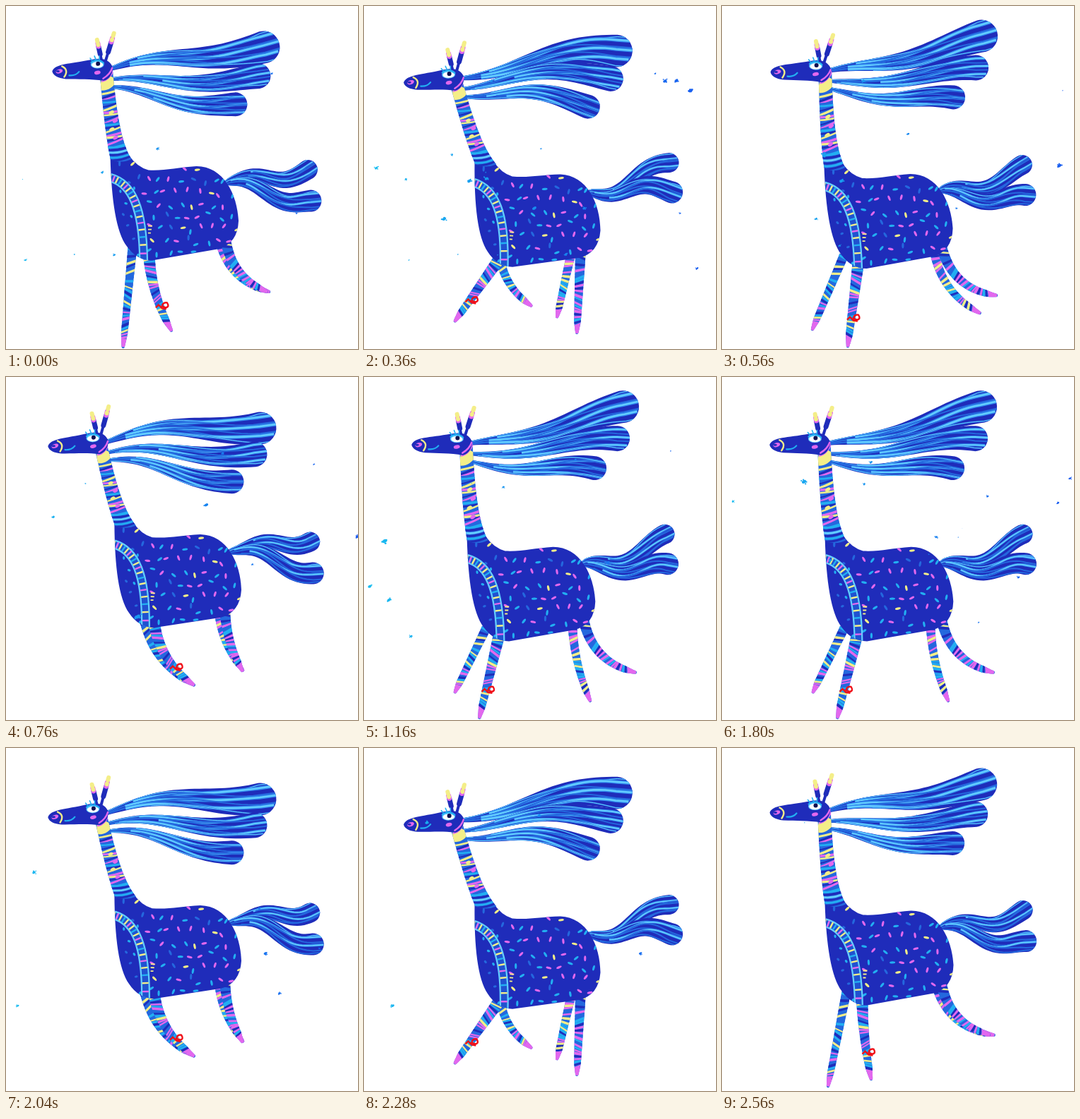
These frames come from a looping animation (498 px wide and 486 px high, 2.6 s). An HTML page with a canvas:

```html
<!DOCTYPE html>
<html lang="en">
<head>
<meta charset="utf-8">
<title>Galloping horse</title>
<style>
html, body { margin: 0; width: 100%; height: 100%; overflow: hidden; background: #fff; }
canvas { display: block; }
</style>
</head>
<body>
<canvas id="stage" width="498" height="486"></canvas>
<script>
const ctx = document.getElementById('stage').getContext('2d');
const LOOP = 2600, STEP = 40, STRIDE = 640;
const NAVY = '#1f2cba', BLUE = '#2468de', CYAN = '#22aff2', SKY = '#64ceff',
      PINK = '#e268ee', YELLOW = '#f4ee88';
const rnd = i => { const v = Math.sin(i * 127.1 + 3.7) * 43758.5453; return v - Math.floor(v); };
const mix = (a, b, s) => a + (b - a) * s;
const wave = (a, phase, mean, c, s) => mean + c * Math.cos(a - phase) + s * Math.sin(a - phase);

// Hoof paths: positions at eight even moments of one stride.
const FORE = [[211, 469], [254, 449], [264, 426], [200, 427], [140, 436], [128, 458], [150, 479], [178, 482]];
const HIND = [[378, 406], [355, 406], [310, 428], [262, 446], [284, 462], [322, 458], [372, 430], [388, 410]];

// Hair: root, resting tip, tip swing, size, ripple phase and mean sag.
const MANE = [
  { root: [150, 94], tip: [365, 61], swing: 19, r: 23, phase: 2, sag: -4 },
  { root: [150, 109], tip: [357, 101], swing: 14, r: 18, phase: 1.3, sag: -4 },
  { root: [150, 120], tip: [325, 141], swing: 12, r: 17, phase: 1.4, sag: -3 }
];
const TAIL = [
  { root: [309, 263], tip: [426, 227], swing: 6.5, r: 14, phase: 3.3, sag: 5 },
  { root: [309, 265], tip: [430, 270], swing: 8, r: 15.5, phase: 2.8, sag: -1 }
];

// Body and head sway as simple harmonics of the stride angle.
const bodyAt = a => ({ x: 240, y: 310, dx: wave(a, 0, 4, -4.5, 3.2), dy: wave(a, 0, -9, -1.5, -10), rot: wave(a, 0, .025, -.025, .012) });
const headAt = a => ({ x: 130, y: 90, dx: wave(a, 0, -5.5, 7, -4.5), dy: wave(a, 0, 2, -7.5, -.5), rot: wave(a, 0, -.025, .025, -.025) });
function place(part, [x, y]) {
  const c = Math.cos(part.rot), s = Math.sin(part.rot), u = x - part.x, v = y - part.y;
  return [part.x + part.dx + u * c - v * s, part.y + part.dy + u * s + v * c];
}
function enter(part) {
  ctx.translate(part.x + part.dx, part.y + part.dy);
  ctx.rotate(part.rot);
  ctx.translate(-part.x, -part.y);
}

// Point on a closed Catmull-Rom curve.
function along(keys, t) {
  const n = keys.length, f = (t / STRIDE % 1 + 1) % 1 * n, i = Math.floor(f), u = f - i;
  const [o, p, q, r] = [n - 1, 0, 1, 2].map(k => keys[(i + k) % n]);
  return [0, 1].map(k => p[k] + u / 2 * (q[k] - o[k] +
    u * (2 * o[k] - 5 * p[k] + 4 * q[k] - r[k] + u * (3 * (p[k] - q[k]) + r[k] - o[k]))));
}

function heading(curve, s) {
  const a = curve(Math.max(0, s - .02)), b = curve(Math.min(1, s + .02));
  return Math.atan2(b[1] - a[1], b[0] - a[0]);
}
function beside(curve, s, off, ahead = 0) {
  const [x, y] = curve(s), a = heading(curve, s), c = Math.cos(a), d = Math.sin(a);
  return [x - d * off + c * ahead, y + c * off + d * ahead];
}
function ribbon(curve, width) {
  const path = new Path2D(), N = 30, a = heading(curve, 1);
  for (let i = 0; i <= N; i++) path.lineTo(...beside(curve, i / N, -width(i / N)));
  path.arc(...curve(1), width(1), a - Math.PI / 2, a + Math.PI / 2);
  for (let i = N; i >= 0; i--) path.lineTo(...beside(curve, i / N, width(i / N)));
  path.closePath();
  return path;
}

function fill(path, color) { ctx.fillStyle = color; ctx.fill(path); }
function stroke(path, color, w) { ctx.strokeStyle = color; ctx.lineWidth = w; ctx.stroke(path); }
function line(d, color, w) { stroke(new Path2D(d), color, w); }
function band(curve, s, half, slant, color, w) {
  const p = new Path2D();
  p.moveTo(...beside(curve, Math.max(0, s - slant), -half));
  p.lineTo(...beside(curve, Math.min(1, s + slant), half));
  stroke(p, color, w);
}
function oval(x, y, rx, ry, color, rot = 0) {
  ctx.beginPath();
  ctx.ellipse(x, y, rx, ry, rot, 0, 7);
  ctx.fillStyle = color;
  ctx.fill();
}
function layer(draw, clip) {
  ctx.save();
  if (clip) ctx.clip(clip);
  draw();
  ctx.restore();
}

// A lock of hair: a ripple runs from the root to a swinging tip.
function hair(lock, a, part, speed, lag, taper, seed) {
  const { r, tip, swing, phase, sag } = lock;
  const [x0, y0] = place(part, lock.root);
  const x1 = tip[0] + part.dx * .8, y1 = tip[1] + swing * Math.cos(a - lag);
  const curve = s => [mix(x0, x1, s),
    mix(y0, y1, s) + Math.sin(Math.PI * s) * (sag + 14 * Math.cos(a + phase - speed * s))];
  const width = s => r * mix(.13, 1, s ** taper);
  const shape = ribbon(curve, width);
  fill(shape, NAVY);
  layer(() => {
    const n = r > 16 ? 9 : 7;
    for (let j = 0; j < n; j++) {
      const k = (j + .5) / n * 1.8 - .9, from = j % 3 ? .35 * rnd(seed + j) : 0, p = new Path2D();
      const at = s => k + .14 * Math.sin(7 * s + seed + j * 2);
      for (let i = 0; i <= 24; i++) {
        const s = mix(from, 1, i / 24);
        p.lineTo(...beside(curve, s, width(s) * at(s)));
      }
      p.lineTo(...beside(curve, 1, r * at(1), r * Math.sqrt(1 - k * k)));
      const main = j % 3 === 1;
      stroke(p, main ? '#3088ee' : BLUE, main ? r / 4.5 : 2);
      if (main || j % 4 === 0) stroke(p, SKY, main ? r / 9 : 1);
    }
  }, shape);
}

const BANDS = [BLUE, YELLOW, NAVY, PINK, CYAN];
function leg(keys, t, body, hip, thick, seed) {
  const [fx, fy] = along(keys, t), [rx, ry] = place(body, hip);
  const hx = rx + .12 * (fx - rx), hy = ry;
  // The knee bows forward as the hoof trails behind the hip.
  const bow = .44 * Math.max(0, fx - hx), len = Math.hypot(fx - hx, fy - hy);
  const cx = (hx + fx) / 2 - bow * (fy - hy) / len, cy = (hy + fy) / 2 + bow * (fx - hx) / len;
  const bend = (h, c, f, s) => mix(mix(h, c, s), mix(c, f, s), s);
  const curve = s => [bend(hx, cx, fx, s), bend(hy, cy, fy, s)];
  const shape = ribbon(curve, s => mix(thick, 4.4, s) * Math.min(1, .5 + (1 - s) * 4));
  fill(shape, BLUE);
  layer(() => {
    for (let i = 0; i < 32; i++) {
      const color = BANDS[(i * 2 + Math.floor(rnd(seed + i) * 3)) % 5];
      band(curve, i / 32, 13, .05 * Math.sin(seed + i / 3), i > 28 ? PINK : color, mix(2, 4, rnd(seed + i * 5)));
    }
    band(curve, .96, 13, 0, PINK, 12);
  }, shape);
  return curve;
}

function ribbonBow([x, y]) {
  line(`M${x - 6} ${y + 2}l4 -4 5 5 6 1M${x + 3} ${y}q1 -6 7 -5 4 6 -2 7z`, '#f01018', 2.4);
}

const TORSO = new Path2D('M146 230C148 290 155 335 170 355Q184 375 206 375L300 358Q327 350 328 318C326 280 306 241 268 241C240 243 224 248 200 247Q184 243 172 226Z');
const SASH = new Path2D('M146 258C176 266 193 298 194 378');
const sash = s => [[146, 176, 193, 194], [258, 266, 298, 378]].map(([a, b, c, d]) =>
  a * (1 - s) ** 3 + 3 * b * s * (1 - s) ** 2 + 3 * c * s * s * (1 - s) + d * s ** 3);

function torso(body) {
  enter(body);
  fill(TORSO, NAVY);
  ctx.clip(TORSO);
  for (let i = 0; i < 96; i++) {
    const col = i % 12, row = Math.floor(i / 12);
    const x = 158 + col * 15.5 + (row % 2) * 7 + rnd(i) * 8, y = 237 + row * 17.5 + rnd(i + 200) * 11;
    const c = rnd(i + 400), chest = x < 186 && y > 264;
    const color = c < .5 ? CYAN : c < .62 ? BLUE : c < .84 ? PINK : YELLOW;
    oval(x, y, chest ? 2.4 : 4, 1.6, chest && c > .5 ? BLUE : color, rnd(i + 600) * 3.14);
  }
  stroke(SASH, SKY, 13);
  stroke(SASH, '#2052d0', 8.5);
  for (let i = 0; i < 19; i++) band(sash, i / 18, 4.5, 0, [YELLOW, PINK, YELLOW, CYAN][i % 4], 2.4);
  for (let i = 0; i < 3; i++) line(`M200 ${326 + i * 5}h${6 - i}`, YELLOW, 1.8);
}

const NECK = new Path2D('M134 108C137 150 139 190 146 232Q160 240 176 232C162 208 156 160 152 94L140 98Z');
function neck(body, head) {
  const base = place(body, [158, 228]), bx = base[0] - 158, by = base[1] - 228;
  const sx = (head.dx - bx) / 118, sy = (head.dy - by) / 118;
  ctx.transform(1, 0, -sx, 1 - sy, bx + sx * 228, by + sy * 228);
  fill(NECK, BLUE);
  ctx.clip(NECK);
  const tones = [YELLOW, NAVY, PINK, BLUE, CYAN, NAVY, YELLOW, BLUE, PINK];
  for (let i = 0; i < 24; i++) {
    const y = 126 + i * 3.9, tilt = 7 + 4 * Math.sin(i * 1.3);
    line(`M130 ${y + tilt}Q152 ${y + 4} 176 ${y - tilt}`, tones[i % 9], mix(2, 3.8, rnd(i + 40)));
  }
  line('M134 118Q144 120 152 106', YELLOW, 16);
  line('M136 112Q146 110 153 95', PINK, 3);
  for (let i = 0; i < 4; i++) oval(149 + (i % 2) * 5, 160 + i * 13, 4, 2.5, i % 2 ? PINK : YELLOW, -.6);
  [CYAN, NAVY, SKY, NAVY, CYAN, NAVY].forEach((c, i) =>
    line(`M140 ${213 + i * 4}Q158 ${217 + i * 4} 178 ${206 + i * 4}`, c, 3));
}

const FACE = new Path2D('M66 97C70 86 90 87 122 81Q146 76 152 93Q150 108 139 111C120 108 104 109 85 108Q68 106 66 97Z');
function ear(x0, y0, x1, y1) {
  const at = s => `${mix(x0, x1, s)} ${mix(y0, y1, s)}`;
  const part = (a, b, color, w) => line(`M${at(a)}L${at(b)}`, color, w);
  part(0, .5, NAVY, 4);
  part(.3, .66, NAVY, 7);
  part(.68, .82, PINK, 7);
  part(.75, .77, YELLOW, 6);
  part(.9, 1, YELLOW, 6);
}
function face(head) {
  enter(head);
  ctx.lineCap = 'round';
  ear(136, 82, 130, 53);
  ear(142, 82, 154, 44);
  fill(FACE, NAVY);
  oval(76, 97, 5, 3, PINK, -.3);
  oval(74, 97, 2.6, 1.5, NAVY);
  line('M80 90Q90 95 83 105', YELLOW, 2.4);
  line('M90 103Q99 104 104 98', CYAN, 2.2);
  oval(130, 99.5, 4.5, 2.6, PINK, -.2);
  oval(130, 88, 9.5, 5.5, SKY);
  oval(130, 88.5, 8, 4.2, '#fff');
  oval(131, 87, 3, 3, '#101050');
  line('M121 85Q130 78 139 86', CYAN, 2);
  line('M123 83L120 79M128 81L126 76M133 81L133 76', CYAN, 1.6);
  line('M138 108Q148 102 151 93', PINK, 2.4);
}

// Paint specks drift downwind; most appear early in the loop.
function specks(t) {
  for (let i = 0; i < 60; i++) {
    const dt = t - 150 - 2250 * rnd(i + 70) ** 1.6, life = 220;
    if (Math.abs(dt) >= life) continue;
    const x = 498 * rnd(i + 140) + dt * .1, y = mix(95, 385, rnd(i + 210));
    const r = mix(1.6, 3.4, rnd(i + 280)) * Math.sqrt(1 - Math.abs(dt) / life);
    const color = `hsl(${mix(194, 222, x / 498)} 88% 52%)`;
    oval(x, y, r * 1.2, r * .8, color, -.5);
    for (let k = 0; k < 5; k++)
      oval(x + (rnd(i * 9 + k) - .5) * r * 3, y + (rnd(i * 7 + k) - .5) * r * 2.4, r * .4, r * .4, color);
  }
}

function draw(t) {
  // The first stride starts slightly late and catches up.
  const ph = t + Math.max(0, 40 - t / 9), a = ph / STRIDE * 2 * Math.PI;
  const body = bodyAt(a), head = headAt(a);
  ctx.fillStyle = '#fff';
  ctx.fillRect(0, 0, 498, 486);
  TAIL.forEach((lock, i) => hair(lock, a, body, 3.7, 1.1, .6, 30 + i * 4));
  MANE.forEach((lock, i) => hair(lock, a, head, 2.2, 2.1, 1, 3 + i * 5));

  // Far legs trail the near ones and meet them when the horse gathers.
  const gather = ((ph - 120) % STRIDE + STRIDE * 1.5) % STRIDE - STRIDE / 2;
  const foreLag = 160 * (1 - Math.exp(-((gather / 45) ** 2)));
  const hindLag = 80 * (1 - Math.sin(a + .6));
  leg(HIND, ph - hindLag, body, [292, 346], 6.5, 11);
  leg(HIND, ph, body, [302, 346], 7.5, 23);
  leg(FORE, ph - foreLag, body, [180, 356], 6.5, 37);
  const fore = leg(FORE, ph, body, [197, 362], 8.5, 52);
  layer(() => torso(body));
  layer(() => neck(body, head));
  layer(() => face(head));
  ribbonBow(fore(.68));
  specks(t);
}

const start = performance.now();
function tick() {
  const t = Math.max(0, performance.now() - start) % LOOP;
  draw(Math.floor(t / STEP) * STEP);
  requestAnimationFrame(tick);
}
tick();
</script>
</body>
</html>
```
